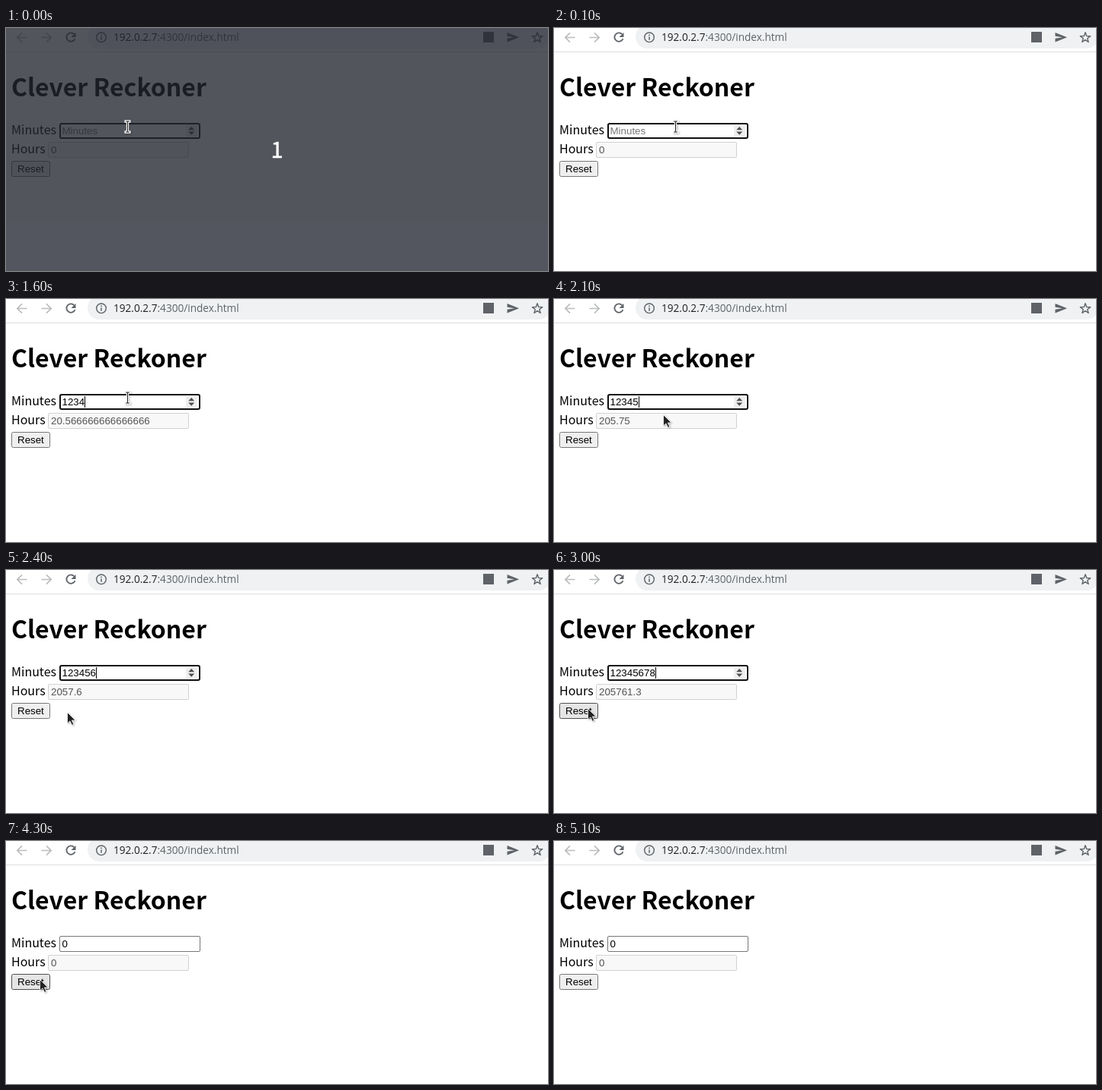
An HTML page for the animation above (5800 ms loop, 711 by 320 pixels).

```html
<!DOCTYPE html>
<html lang="en">
<head>
<meta charset="utf-8">
<title>Minutes to hours</title>
<style>
html, body { margin: 0; width: 100%; height: 100%; overflow: hidden; background: #fff; }
svg { display: block; }
text { white-space: pre; }
.page { font: 16px "Noto Sans CJK JP", "Noto Sans CJK SC", "Noto Sans CJK", "Noto Sans", sans-serif; }
.page .title { font-size: 32px; font-weight: 700; }
.form { font: 13.333px "Liberation Sans", Arial, sans-serif; }
.url { font: 13.6px "Open Sans", "Noto Sans", sans-serif; }
.count { font-size: 29px; }
.pointer { filter: drop-shadow(1px 1px 1px rgba(0, 0, 0, .3)); }
</style>
</head>
<body>
<svg width="711" height="320" viewBox="0 0 711 320">
  <!-- browser bar -->
  <rect x="107" y="-4" width="607" height="31" rx="15.5" fill="#eff1f2"/>
  <path d="M0 31.5H711" stroke="#dadce0"/>
  <g fill="none" stroke="#babcbe" stroke-width="1.7">
    <path d="M27.5 12.5H15M21 6.3L14.8 12.5L21 18.7"/>
    <path d="M46.5 12.5H59M53 6.3L59.2 12.5L53 18.7"/>
  </g>
  <g fill="none" stroke="#5f6368">
    <path d="M89.3 8.2A5.7 5.7 0 1 0 90.5 14" stroke-width="1.8"/>
    <circle cx="125" cy="12.3" r="6.3" stroke-width="1.4"/>
    <path d="M125 11.5V15.8M125 8.6V10.2" stroke-width="1.5"/>
    <path id="star" stroke-width="1.4" stroke-linejoin="round"/>
  </g>
  <path d="M91.5 6V12H85.5Z" fill="#5f6368"/>
  <rect x="626" y="5" width="14" height="14" fill="#5f6368"/>
  <path d="M657.5 6L673 12.3L657.5 18.5V13.8L667 12.3L657.5 10.8Z" fill="#5f6368"/>
  <text class="url" x="141" y="17" fill="#202124">192.0.2.7<tspan fill="#5f6368">:4300/index.html</tspan></text>

  <!-- page -->
  <g class="page">
    <text class="title" x="7" y="90">Clever Reckoner</text>
    <text x="7" y="140">Minutes</text>
    <text x="7" y="165">Hours</text>
  </g>
  <g class="form">
    <rect id="blurred" x="70.5" y="125.5" width="184" height="20" rx="1.5" fill="#fff" stroke="#767676"/>
    <g id="focused">
      <rect x="71" y="126" width="183" height="19" rx="2" fill="#fff" stroke="#101010" stroke-width="2"/>
      <rect x="236" y="128" width="15" height="15" fill="#efefef"/>
      <path d="M239.2 134.3L243.2 130L247.2 134.3ZM239.2 136.5L243.2 140.8L247.2 136.5Z" fill="#4d4d4d"/>
    </g>
    <text id="minutes" x="73.5" y="140"></text>
    <rect id="caret" y="128" width="1" height="15"/>
    <rect x="55.5" y="150.5" width="184" height="20" rx="1.5" fill="#f8f8f8" stroke="#d1d1d1"/>
    <text id="hours" x="59" y="165" fill="#545454"></text>
    <rect id="button" x="7.5" y="175.5" width="50" height="20" rx="2"/>
    <text x="15" y="190">Reset</text>
  </g>

  <g id="dim">
    <rect width="711" height="320" fill="#232630" fill-opacity=".78"/>
    <text class="page count" x="355.5" y="171" text-anchor="middle" fill="#fff" stroke="#fff" stroke-width=".5">1</text>
  </g>

  <!-- mouse -->
  <g id="beam" class="pointer" fill="none">
    <path d="M-4 -7H4M-4 7H4M0 -7V7" stroke="#fff" stroke-width="3.4"/>
    <path d="M-2.5 -7H2.5M-2.5 7H2.5M0 -7V7" stroke="#222" stroke-width="1.1"/>
  </g>
  <path id="arrow" class="pointer" d="M.5 .5V15L4 11.9L6.5 17.3L8.8 16.3L6.4 11H11Z" fill="#222" stroke="#fff" stroke-width=".8"/>
</svg>
<script>
const LOOP = 5800, DIGIT = 7.415;
const $ = id => document.getElementById(id);

// time, text in the minutes field
const typed = [[0, ''], [1000, '1'], [1100, '12'], [1200, '123'], [1600, '1234'], [2000, '12345'],
  [2400, '123456'], [2700, '1234567'], [3000, '12345678'], [3300, '123456789'], [4300, '0']];
// time, pointer x, y
const moves = [[0, 159.5, 130], [2000, 154, 136], [2100, 143, 152], [2200, 122, 174], [2300, 101, 187],
  [2400, 80, 187], [2500, 57, 189], [2600, 51, 187], [2700, 48, 185], [2800, 45, 183], [2900, 44, 182],
  [4700, 55, 180], [4800, 70, 178], [5000, 303, 28], [5100, -50, -50]];

const at = (steps, t) => steps.findLast(step => step[0] <= t);
const show = (id, on) => $(id).setAttribute('visibility', on ? 'visible' : 'hidden');

function draw(t) {
  const text = at(typed, t)[1];
  const focus = t < 4200;
  $('minutes').textContent = text || 'Minutes';
  $('minutes').setAttribute('fill', text ? '#000' : '#757575');
  $('hours').textContent = t < 1100 ? 0 : text / 60;
  $('caret').setAttribute('x', Math.round(73.5 + text.length * DIGIT));
  show('caret', t >= 400 && t < 3900);
  show('focused', focus);
  show('blurred', !focus);
  show('dim', t < 100);

  const [, x, y] = at(moves, t);
  const overInput = y > 125 && y < 146;
  show('beam', overInput);
  show('arrow', !overInput);
  $(overInput ? 'beam' : 'arrow').setAttribute('transform', `translate(${x} ${y})`);

  const hover = x > 7 && x < 57 && y > 175 && y < 196;
  const pressed = t >= 4200 && t < 4300;
  const [fill, stroke] = pressed ? ['#f5f5f5', '#8d8d8d'] : hover ? ['#e5e5e5', '#4f4f4f'] : ['#efefef', '#767676'];
  $('button').setAttribute('fill', fill);
  $('button').setAttribute('stroke', stroke);
}

const corners = Array.from({ length: 10 }, (_, i) => {
  const r = i % 2 ? 2.9 : 7, a = (i / 5 - .5) * Math.PI;
  return `${697 + r * Math.cos(a)} ${12.8 + r * Math.sin(a)}`;
});
$('star').setAttribute('d', `M${corners.join('L')}Z`);

const start = performance.now();
function tick() {
  draw((performance.now() - start) % LOOP);
  requestAnimationFrame(tick);
}
tick();
</script>
</body>
</html>
```
